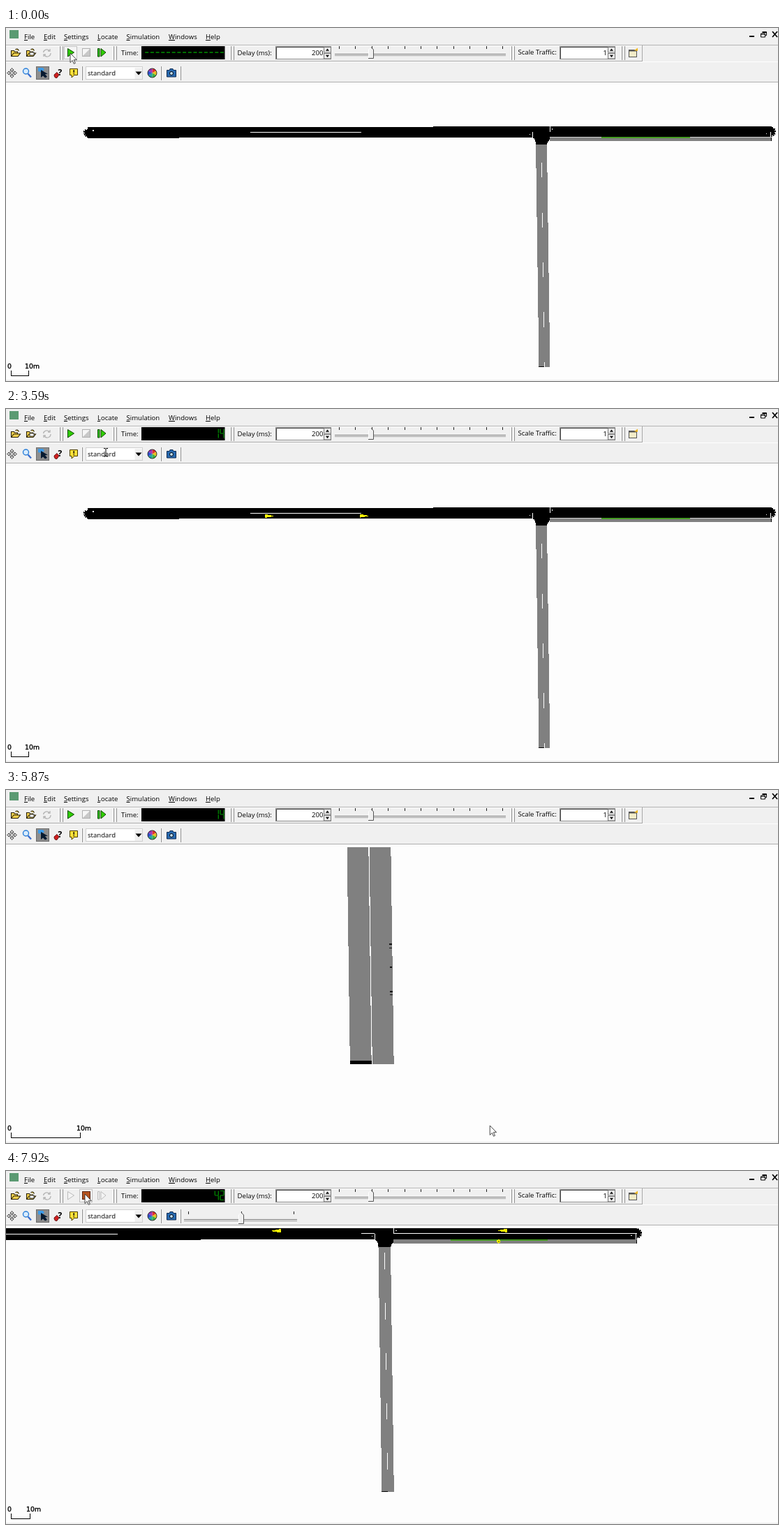
An HTML page that plays this animation: 1106 px wide and 506 px high, repeating every 8 s.

```html
<!DOCTYPE html>
<html lang="en">
<head>
<meta charset="utf-8">
<title>Traffic simulation</title>
<style>
html, body { margin: 0; width: 100%; height: 100%; overflow: hidden; background: #fdfdfd; }
svg { display: block; }
text { font-family: "Open Sans", "Noto Sans", sans-serif; font-size: 9.6px; fill: #000; }
.scale text { font-family: "DejaVu Sans", sans-serif; font-size: 9.3px; text-anchor: middle; stroke: #000; stroke-width: .35; }
</style>
</head>
<body>
<svg id="stage" width="1106" height="506" viewBox="0 0 1106 506">
  <defs><clipPath id="view"><rect y="82" width="1106" height="422"/></clipPath></defs>
  <rect width="1106" height="506" fill="#fdfdfd"/>
  <g clip-path="url(#view)"><g id="world" shape-rendering="crispEdges"></g></g>
  <g class="scale">
    <path id="bar" fill="none" stroke="#000" shape-rendering="crispEdges"/>
    <text x="5" y="487.500">0</text><text id="barEnd" y="487.500">10m</text>
  </g>
  <rect y="504" width="1106" height="2" fill="#f0f0f0"/>
  <g id="ui"></g>
  <circle id="press" r="10" fill="#ffff00" opacity=".52"/>
  <path id="arrow" d="M0 0V13.500L3.200 10.500L5.300 15.300L7.300 14.400L5.200 9.700H9.400Z" fill="#fff" stroke="#333" stroke-width=".9"/>
  <path id="beam" d="M-3 -5.500H-.8L0 -4.500L.8 -5.500H3M0 -4.500V5M-3 6H-.8L0 5L.8 6H3" fill="none" stroke="#000"/>
</svg>
<script>
const NS = "http://www.w3.org/2000/svg";
const byId = id => document.getElementById(id);
const world = byId("world"), ui = byId("ui");

function add(parent, tag, attrs, label) {
  const el = document.createElementNS(NS, tag);
  for (const k in attrs) el.setAttribute(k, attrs[k]);
  if (label) el.textContent = label;
  parent.appendChild(el);
  return el;
}
const shape = (parent, d, fill, stroke = "none", width = 1) =>
  add(parent, "path", { d, fill, stroke, "stroke-width": width });
const box = (parent, x, y, width, height, fill, stroke = "none") =>
  add(parent, "rect", { x, y, width, height, fill, stroke });
const label = (x, y, s, anchor = "start") => add(ui, "text", { x, y, "text-anchor": anchor }, s);
const show = (el, on) => el.setAttribute("display", on ? "inline" : "none");

// ---- road network, in pixels at zoom 1 ----
const SOUTH_END = 486.2, GAP = 0.15;
const axisY = x => 149.5 - (x - 434) / 514;
const axisX = y => 767.5 + (y - 202.8) / 71.5;
const flat = (x0, x1, dy, h) =>
  `M${x0} ${axisY(x0) + dy - h}L${x1} ${axisY(x1) + dy - h}V${axisY(x1) + dy + h}L${x0} ${axisY(x0) + dy + h}Z`;
const upright = (y0, y1, l, r) =>
  `M${axisX(y0) + l} ${y0}H${axisX(y0) + r}L${axisX(y1) + r} ${y1}H${axisX(y1) + l}Z`;

shape(world, upright(160, SOUTH_END, -7.95, 7.95), "#808080");
shape(world, upright(166, SOUTH_END, -GAP, GAP), "#fff");
shape(world, upright(485, SOUTH_END, -7.95, -GAP), "#000");
const marks = add(world, "g", {});
for (const y of [442.6, 444, 451, 459.8, 461])
  box(marks, axisX(y) + 6.9, y - 0.2, 0.9, 0.45, "#111");

shape(world, flat(117, 755, 0, 7.65), "#000");
shape(world, flat(117, 754, 0, GAP), "#fff");
box(world, 779, 141.11, 318, 15.3, "#000");
box(world, 779, 148.61, 318, 0.3, "#fff");
box(world, 779, 156.41, 318, 5.4, "#808080");
box(world, 779, 156.41, 318, 0.5, "#d0d0d0");
box(world, 853, 156.2, 127, 2.2, "#459a22");
box(world, 1095.6, 157, 1.4, 4.8, "#000");
shape(world, "M754.500 141.100H779V158Q778.500 162.500 776 163L775.300 166.500H759.200L758.600 163Q757.500 158 754.500 157Z", "#000");
box(world, 753.8, 149.2, 1, 7.4, "#fff");
box(world, 778.9, 141, 1, 7.5, "#fff");
box(world, 1095, 149.2, 0.9, 7, "#fff");
for (const [x, y] of [[125, 147], [750.8, 152.3], [782.3, 145], [1089.3, 151.4]])
  box(world, x - 0.6, y - 0.6, 1.2, 1.2, "#fff");
for (const d of ["M118 146.500Q112 145 112.500 150Q113 155 118 155.500", "M1097 143.500Q1101.500 144 1101.500 149Q1101.500 153 1097 154.500"])
  add(world, "path", { d, fill: "#000", stroke: "#000", "stroke-width": 2.6, "stroke-dasharray": "2 1" });

const car = dir => shape(world, `M0 -2.700L${dir * 12} -.3V.5L0 2.500Z`, "#f4f000");
const east = [car(1), car(1)], west = [car(-1), car(-1)];
const person = add(world, "circle", { cx: 916, cy: 159.2, r: 1.7, fill: "#9a9a00", stroke: "#f4f000", "stroke-width": 1.4 });

// ---- menu and tool bars ----
box(ui, 0, 0, 1106, 81, "#f0f0f0");
const rule = (x, y, w, h, c) => box(ui, x, y, w, h, c);
rule(0, 24, 1106, 1, "#b4b4b4"); rule(0, 25, 911, 1, "#fff");
rule(0, 47, 911, 1, "#a8a8a8"); rule(911, 25, 1, 23, "#a8a8a8"); rule(0, 48, 1106, 1, "#fff");
rule(0, 77, 1106, 1, "#b0b0b0"); rule(0, 78, 1106, 3, "#fafafa");

function grip(x, y) {
  rule(x, y, 1, 20, "#fff"); rule(x + 1, y, 1, 20, "#8c8c8c");
}
for (const x of [76, 153, 321, 723, 881]) { grip(x, 26); grip(x + 4, 26); }
for (const x of [108, 221, 249]) grip(x, 55);

box(ui, 5, 3, 13, 12, "#5b9a72");
for (const [x, s, w] of [[26, "File", 5], [54, "Edit", 5], [83, "Settings", 5], [131, "Locate", 4], [172.5, "Simulation", 5], [233, "Windows", 9], [286, "Help", 7]]) {
  label(x, 15.5, s); rule(x, 17, w, 1, "#000");
}
rule(1065, 11, 7, 2, "#000");
shape(ui, "M1083.500 5.500H1089.500V10.500H1087.500M1081.500 8H1087.500V13H1081.500ZM1083.500 6.500H1089.500M1081.500 9H1087.500", "none", "#000");
shape(ui, "M1098 5L1105 13M1105 5L1098 13", "none", "#000", 1.7);

const folder = x => shape(ui, `M${x} 40.500V32.500H${x + 4}L${x + 5} 34H${x + 9}V36H${x + 13}L${x + 9.5} 40.500ZM${x} 40.500L${x + 3.5} 36H${x + 9}M${x + 6} 31Q${x + 9} 28.500 ${x + 11} 32.500`, "#f5d34f", "#2a2208", 1.1);
folder(7.5); folder(29.5);
box(ui, 34, 35, 6, 4, "#fff", "#333");
shape(ui, "M53.500 35A5 5 0 0 1 62 32.500M64 36A5 5 0 0 1 55 39M60 33H63V30M57 38H54V41", "none", "#b4b4b4", 1.3);

const hover = box(ui, 83.5, 26.5, 18, 18, "#f5f5f5", "#c0c0c0");
const play = shape(ui, "M88.500 29.500L97.500 35L88.500 41Z", "#2fd000");
const stop = box(ui, 109.5, 29.5, 11, 11, "#eee");
const stopCut = shape(ui, "M120 30V40H110Z", "#c8c8c8");
const step = shape(ui, "M131.500 29.500H134V41H131.500ZM136 29.500L143 35L136 41Z", "#2fd000");

label(165, 39, "Time:");
box(ui, 194, 26, 119.5, 19, "#000");
const digits = shape(ui, "", "none", "#00d800", 1.2);

function field(x) {
  box(ui, x + .5, 26.5, 79, 18, "#fff", "#8a8a8a");
  shape(ui, `M${x + 1.5} 44V27.500H${x + 69}`, "none", "#444");
  for (const y of [27, 36]) {
    box(ui, x + 69.5, y + .5, 10, 7.5, "#ececec", "#777");
    const d = y < 30 ? 1 : -1, m = y + 4.3;
    shape(ui, `M${x + 72} ${m + d * 1.5}H${x + 77}L${x + 74.5} ${m - d * 1.7}Z`, "#000");
  }
}
label(331.5, 39, "Delay (ms):"); field(386); label(454.5, 39, "200", "end");
label(733.5, 38, "Scale Traffic:"); field(793); label(861, 39, "1", "end");

function slider(g, x0, x1, y, ticks, thumb) {
  box(g, x0, y, x1 - x0, 1, "#777"); box(g, x0, y + 1, x1 - x0, 2, "#fff");
  box(g, x0, y + 2, x1 - x0, 1, "#999");
  for (const x of ticks) box(g, x, y - 11, 1, 4, "#222");
  shape(g, `M${thumb - 3} ${y - 6}L${thumb} ${y - 9}L${thumb + 3} ${y - 6}V${y + 6}H${thumb - 3}Z`, "#f0f0f0");
  shape(g, `M${thumb - 3.5} ${y + 6}V${y - 6}L${thumb} ${y - 9.5}`, "none", "#fff");
  shape(g, `M${thumb} ${y - 9.5}L${thumb + 3.5} ${y - 6}V${y + 6.5}H${thumb - 4}`, "none", "#555");
}
slider(ui, 471, 716, 37, Array.from({ length: 11 }, (_, i) => Math.round(477 + 23.4 * i)), 523);
box(ui, 892.5, 31.5, 11, 10, "#f3ecc8", "#555"); box(ui, 892.5, 31.5, 11, 2, "#555");
shape(ui, "M900 32L905 28.500L905 33Z", "#f0b820");

shape(ui, "M8.500 57.500L11 60.500H9.500V63.500H12.500V62L15.500 64.500L12.500 67V65.500H9.500V68.500H11L8.500 71.500L6 68.500H7.500V65.500H4.500V67L1.500 64.500L4.500 62V63.500H7.500V60.500H6Z", "#fff", "#222", .9);
shape(ui, "M31.500 65.500L36 70.500", "none", "#3b6fd0", 2.4);
add(ui, "circle", { cx: 28.5, cy: 62, r: 4, fill: "#d8ecff", stroke: "#2c7fd8", "stroke-width": 1.4 });
box(ui, 43.5, 55.5, 18, 18, "#8e8e8e", "#6c6c6c");
shape(ui, "M46 57H53L55 60L50 63L46 62Z", "#3d9be8"); shape(ui, "M50 60V71L53 68.500L56 71.500L59 70L56 66H60Z", "#071a30");
shape(ui, "M69 67L73 63.500L76 67L73 71.500Q69 72 69 67Z", "#d02020", "#400", .8);
add(ui, "text", { x: 74.5, y: 68, "font-weight": 700, style: "font-size: 12px" }, "?");
shape(ui, "M91.500 58.500H102.500V67.500H98L94 71V67.500H91.500Z", "#ffe13a", "#4a3c00");
rule(96.5, 60, 1.4, 4, "#000"); rule(96.5, 65, 1.4, 1.4, "#000");

box(ui, 114.5, 55.5, 81, 18, "#fff", "#cfcfcf");
box(ui, 184.5, 57, 10.5, 16, "#f0f0f0"); shape(ui, "M185.500 62.500H194.500L190 67.500Z", "#000");
label(117, 68, "standard");
["#e03030", "#e8c020", "#40b040", "#20a0a0", "#3050d0", "#a030b0"].forEach((c, i) => {
  const at = k => `${209.5 + 6.5 * Math.sin(k * Math.PI / 3)} ${64.5 - 6.5 * Math.cos(k * Math.PI / 3)}`;
  shape(ui, `M209.500 64.500L${at(i)}A6.500 6.500 0 0 1 ${at(i + 1)}Z`, c);
});
add(ui, "circle", { cx: 209.5, cy: 64.5, r: 6.5, fill: "none", stroke: "#222", "stroke-width": .9 });
shape(ui, "M230.500 60.500H234L235 58.500H239L240 60.500H243.500V70H230.500Z", "#286ab0", "#102a50");
add(ui, "circle", { cx: 237, cy: 65, r: 2.5, fill: "#bfe0ff", stroke: "#000" });
const extra = add(ui, "g", {});
slider(extra, 255, 417, 69, [261, 337, 412], 337);

// ---- timing ----
const LOOP = 8000;
const bursts = [[0, 0, 1], [390, 1100, 10], [3290, 3430, 3], [3590, 4370, 11], [4450, 5230, 11], [5310, 5630, 5],
  [5870, 5950, 2], [6090, 6330, 4], [6550, 6880, 5], [7120, 7390, 4], [7540, 7670, 3], [7920, 7920, 1]];
const ticks = [460, 620, 860, 1020, 1250, 1490, 1710, 1870, 2110, 2280, 2510, 2650, 2900, 3050, 3290];
const lateTicks = [7120, 7390, 7540, 7670, 7920];
const changes = [...ticks.slice(4)];
for (const [a, b, n] of bursts)
  for (let i = 0; i < n; i++) changes.push(Math.floor((a + (b - a) * i / Math.max(1, n - 1)) / 10) * 10);
const snap = t => Math.max(...changes.filter(c => c <= t));
const within = (t, a, b) => t >= a && t < b;

// t, zoom, x, y
const views = [[0, 1, 0, 0], [3950, 1, 0, 0], [4290, 1, -82, -85.4], [4530, 1, -82, -85.4],
  [5000, 2.12, -1002.7, -577.7], [5300, 2.12, -1002.7, -577.7], [5630, 3.8, -2406, -1451], [5950, 4, -2562, -1553],
  [6550, 2.86, -1673.3, -971.6], [6880, 1.13, -325, -90], [7119, 1.13, -325, -90], [7120, 1.0975, -299.55, -73.76]];
// t, x, y
const path = [[0, 92, 36], [630, 92, 36], [1000, 114, 34], [3430, 114, 34], [3590, 143, 62], [3950, 880, 436],
  [4290, 798, 351], [4450, 780, 354], [4610, 738, 354], [5000, 738, 354], [5230, 630, 391], [5630, 697, 460],
  [5950, 692, 488], [6550, 686, 422], [6880, 92, 36], [7120, 92, 36], [7390, 113, 33]];

function along(keys, t) {
  const i = keys.findLastIndex(k => k[0] <= t);
  const a = keys[i], b = keys[i + 1] || a;
  const f = b === a ? 0 : (t - a[0]) / (b[0] - a[0]);
  return a.slice(1).map((v, j) => v + (b[j + 1] - v) * f);
}

// car tails: gentle start, then steady speed
const start = [117, 122, 131, 147, 168];
const lead = n => n < 5 ? start[n] : 168 + 33.9 * (n - 4);
const second = n => n < 8 ? [117, 121, 129, 144, 165][n - 3] : n < 12 ? 190 + 29.3 * (n - 8) : 306 + 32.5 * (n - 12);

function place(el, x, dy) {
  el.setAttribute("transform", `translate(${x} ${(x > 779 ? 148.76 : axisY(x)) + dy})`);
}

const segs = ["M0 0H5", "M5 0V6", "M5 7V13", "M0 13H5", "M0 7V13", "M0 0V6", "M0 6.500H5"];
const glyphs = ["012345", "12", "01643", "01623", "5612", "05623", "056423", "012", "0123456", "012356"];
function glyph(s, cell) {
  const x = 307 - cell * 7.7;
  return [...s].map(k => segs[k].replace(/^M(\S+) (\S+?)([HV])(.*)$/, (_, a, b, c, d) =>
    `M${x + +a} ${28.5 + +b}${c}${+d + (c === "H" ? x : 28.5)}`)).join("");
}
function readout(n) {
  if (n < 0) return Array.from({ length: 15 }, (_, i) => glyph("6", i)).join("");
  return glyph(glyphs[n % 10], 0) + glyph(glyphs[Math.floor(n / 10)], 1);
}

function draw(now) {
  const t = snap(now);
  const late = t >= 7120;
  const n = late ? 37 + lateTicks.filter(k => k <= t).length : ticks.filter(k => k <= t).length - 1;
  const running = within(t, 460, 3430) || late;

  const [z, ox, oy] = along(views, t);
  world.setAttribute("transform", `matrix(${z} 0 0 ${z} ${ox} ${oy})`);
  show(marks, z > 1.6);
  const end = 7.5 + Math.round(25 * z);
  byId("bar").setAttribute("d", `M7.500 491V498.500M7 498.500H${end + .5}M${end} 491V498.500`);
  byId("barEnd").setAttribute("x", end + 5);

  show(east[0], !late && n >= 0);
  show(east[1], !late && n >= 3);
  if (!late && n >= 0) place(east[0], lead(n), 3.8);
  if (!late && n >= 3) place(east[1], second(n), 3.8);
  west.forEach((c, i) => { show(c, late); place(c, [632, 927.6][i] + 34 * (42 - n), -3.75); });
  show(person, late);

  digits.setAttribute("d", readout(n));
  digits.setAttribute("stroke", n < 0 || running && !late ? "#00d800" : "#009400");
  for (const el of [play, step]) {
    el.setAttribute("fill", running ? "#f4f4f4" : "#2fd000");
    el.setAttribute("stroke", running ? "#bcbcbc" : "#124800");
  }
  stop.setAttribute("fill", running ? (late ? "#b4531f" : "#f0501c") : "#f6f6f6");
  stop.setAttribute("stroke", running ? "#5a2410" : "#b0b0b0");
  show(stopCut, !running);
  show(extra, t >= 6200);

  const [x, y] = along(path, t);
  show(hover, y < 45 && x < 124);
  hover.setAttribute("x", x < 104 ? 83.5 : 105.5);
  const text = x > 115 && x < 184 && y > 55 && y < 74;
  const pointer = byId(text ? "beam" : "arrow");
  show(byId("beam"), text);
  show(byId("arrow"), !text);
  pointer.setAttribute("transform", `translate(${x} ${y})`);
  const press = byId("press");
  show(press, within(t, 390, 550) || within(t, 3290, 3430) || within(t, 3950, 4370));
  press.setAttribute("cx", x);
  press.setAttribute("cy", y);
}

function loop() {
  draw(performance.now() % LOOP);
  requestAnimationFrame(loop);
}
loop();
</script>
</body>
</html>
```
